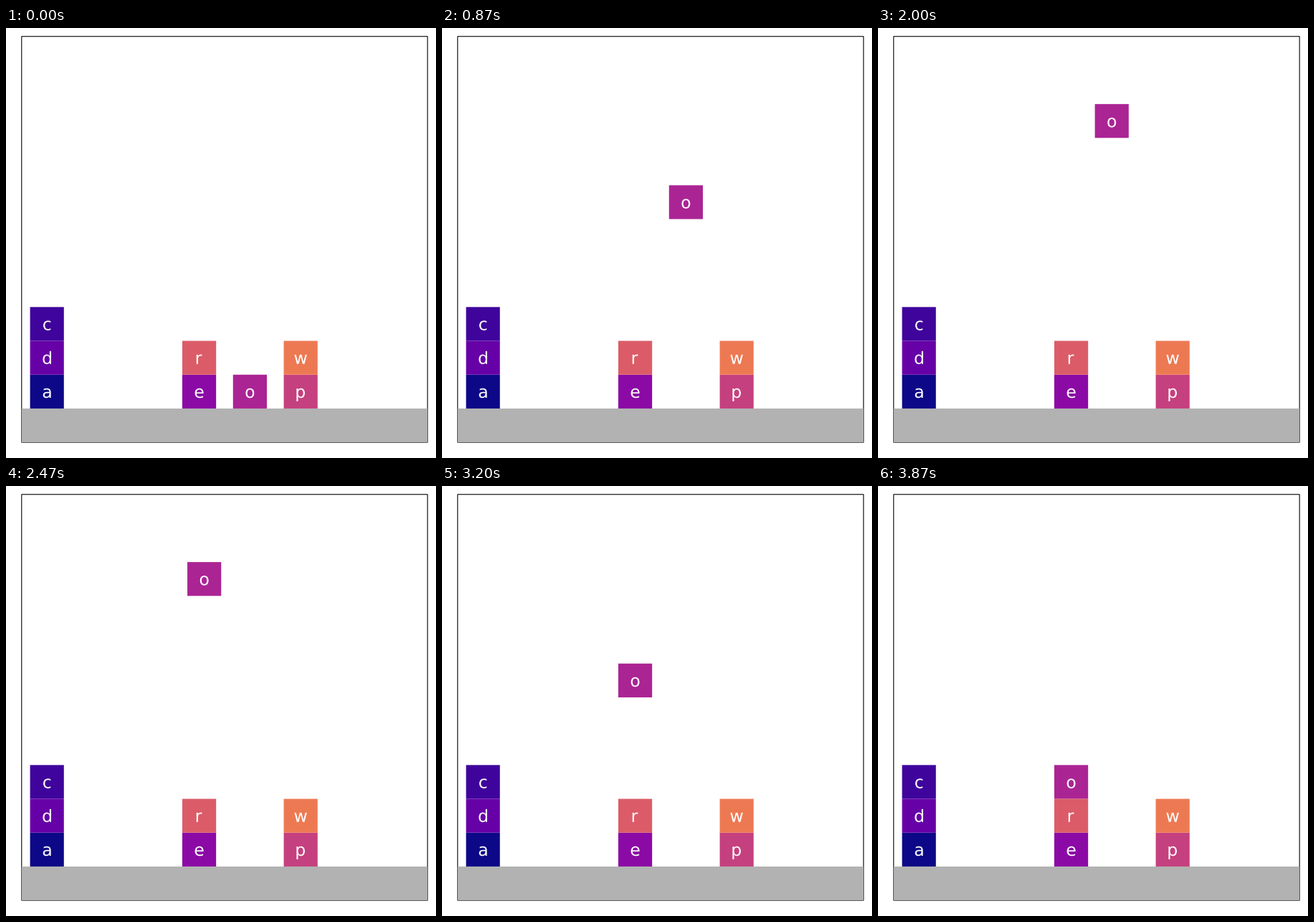
A matplotlib script for the animation above (3.94 s loop, 600 by 600 pixels).

```python
import matplotlib.pyplot as plt
from matplotlib.animation import FuncAnimation
from matplotlib.patches import PathPatch, Rectangle
from matplotlib.textpath import TextPath
from matplotlib.transforms import Affine2D

SIZE = 600            # stage in pixels
UNIT = 47.2           # pixels per block
LEFT, BOTTOM = 21.78, 21.85
CELLS = 12
TICK = 10             # ms
TICKS = 394
LAST_STEP = 58

FONT = {"family": "DejaVu Sans"}
LETTER = 0.5          # font size in block units
BASELINE = 0.318

# letter: (column, level)
START = {
    "a": (0, 0), "c": (0, 2), "d": (0, 1), "e": (3, 0),
    "o": (4, 0), "p": (5, 0), "r": (3, 1), "w": (5, 1),
}

fig = plt.figure(figsize=(SIZE / 100, SIZE / 100), dpi=100, facecolor="white")
side = CELLS * UNIT / SIZE
ax = fig.add_axes([LEFT / SIZE, BOTTOM / SIZE, side, side])
ax.set_xlim(0, CELLS)
ax.set_ylim(-1, CELLS - 1)
ax.axis("off")


def add_box(x, y, w, h, z, **style):
    box = Rectangle((x, y), w, h, snap=False, clip_on=False, zorder=z, **style)
    return ax.add_patch(box)


class Block:
    def __init__(self, letter, color, z):
        self.box = add_box(0, 0, 1, 1, z, facecolor=color, linewidth=0)
        glyph = TextPath((0, 0), letter, size=LETTER, prop=FONT)
        ink = glyph.get_extents()
        self.shift = 0.5 - (ink.x0 + ink.x1) / 2
        self.label = PathPatch(glyph, facecolor="white", linewidth=0,
                               snap=False, zorder=z + 0.5)
        ax.add_patch(self.label)

    def move(self, x, y):
        self.box.set_xy((x, y))
        place = Affine2D().translate(x + self.shift, y + BASELINE)
        self.label.set_transform(place + ax.transData)


add_box(0, -1, CELLS, CELLS, 1, fill=False, edgecolor="black",
        linewidth=1.1 * 0.72, joinstyle="miter")
add_box(0, -1, CELLS, 1, 2, facecolor="#b2b2b2", linewidth=0)

blocks = {}
for i, (letter, (column, level)) in enumerate(START.items()):
    blocks[letter] = Block(letter, plt.cm.plasma(i * 2 / 21), 3 + i)
    blocks[letter].move(0.25 + 1.5 * column, level)


def ramp(step, count):
    return min(max(step, 0), count) / count


def update(tick):
    # poses change 15 times a second, rounded to the nearest tick
    step = min(int((tick + 0.5) * 3 / 20), LAST_STEP)
    # lift and slide skip their first small step
    lift = ramp(step + 1, 20) if step > 0 else 0
    slide = ramp(step - 28, 10) if step >= 30 else 0
    drop = ramp(step - 38, 20)
    blocks["o"].move(6.25 - 1.5 * slide, 8 * lift - 6 * drop)
    return blocks["o"].box, blocks["o"].label


anim = FuncAnimation(fig, update, frames=TICKS, interval=TICK,
                     repeat=True, repeat_delay=0, blit=False)
plt.show()
```
